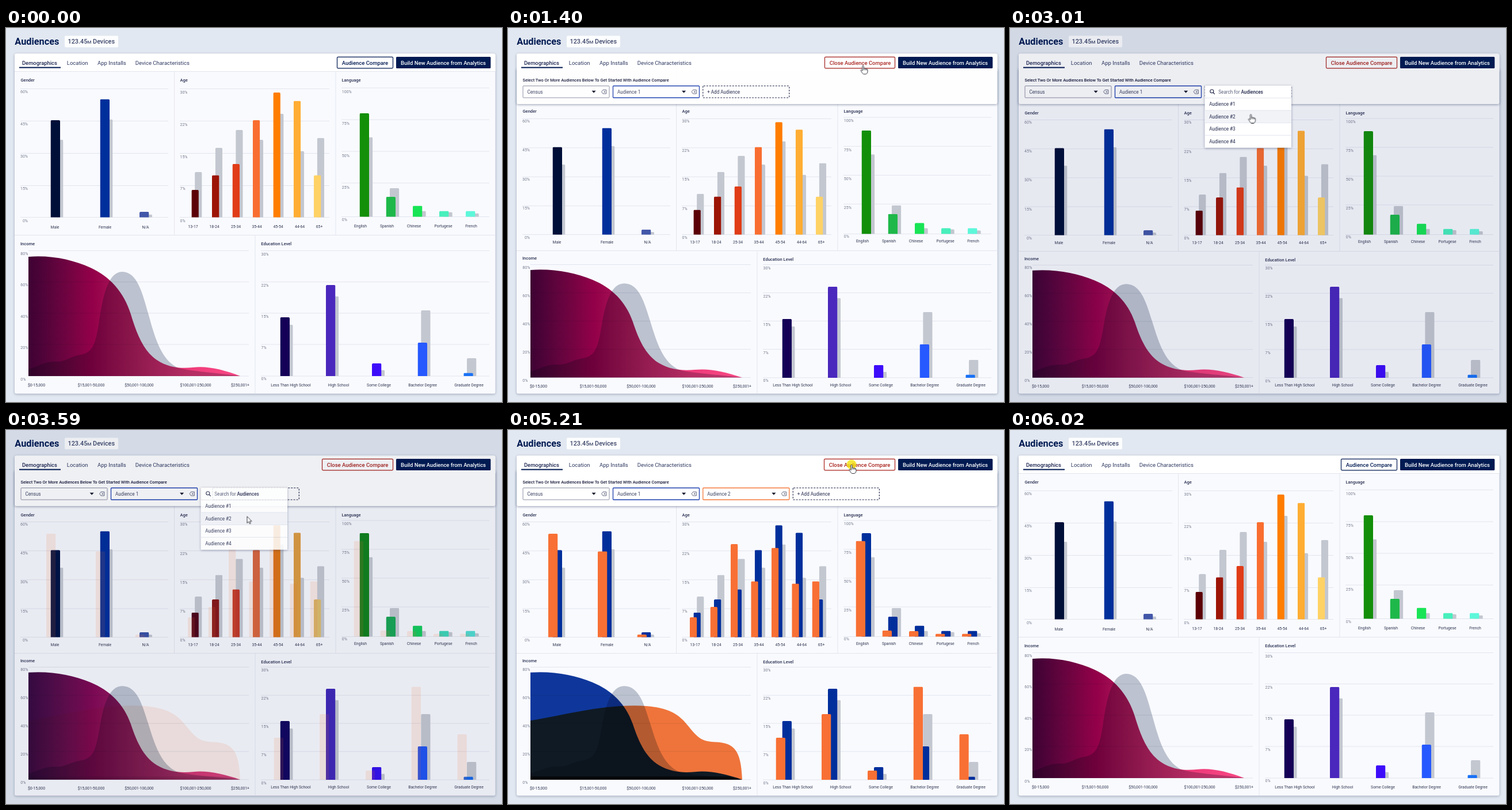
An HTML page for the animation above (6470 ms loop, 862x649 px).

```html
<!DOCTYPE html>
<html lang="en">
<head>
<meta charset="utf-8">
<title>Audiences</title>
<style>
  /* --p: compare panel open, --c: second audience chosen, --d: dropdown opened */
  @property --p { syntax: "<number>"; inherits: true; initial-value: 0; }
  @property --c { syntax: "<number>"; inherits: true; initial-value: 0; }
  @property --d { syntax: "<number>"; inherits: true; initial-value: 0; }
  @property --hand { syntax: "<number>"; inherits: true; initial-value: 0; }

  html, body { margin: 0; width: 100%; height: 100%; overflow: hidden; background: #e2e8f1; }
  svg { display: block; font-family: Roboto, "Open Sans", Arial, sans-serif; }
  #stage {
    --q: calc(var(--c) * var(--p));
    --drop: calc(var(--d) * (1 - var(--c)));
    animation: panel 6470ms infinite, choose 6470ms infinite, drop 6470ms infinite;
    animation-timing-function: cubic-bezier(.65, 0, .35, 1);
  }
  @keyframes panel {
    0%, 16.54% { --p: 0; }
    22.87%, 85.94% { --p: 1; }
    92.12%, 100% { --p: 0; }
  }
  @keyframes choose {
    0%, 53.54% { --c: 0; }
    59.72%, 100% { --c: 1; }
  }
  @keyframes drop {
    0%, 31.38% { --d: 0; }
    36.01%, 100% { --d: 1; }
  }

  .line { stroke: #e2e5ee; fill: none; }
  .bar { clip-path: inset(0 0 2px 0); }
  .second { fill: #f87034; opacity: var(--q); }
  .curve { mix-blend-mode: multiply; }
  .panel { fill: #f9fafe; filter: drop-shadow(0 1px 2px rgba(20, 40, 80, .35)); }
  .sheet { fill: #fff; filter: drop-shadow(0 1.5px 2px rgba(20, 35, 75, .45)); }
  .list { fill: #fff; filter: drop-shadow(0 1px 2px rgba(20, 35, 75, .4)); }
  .open { opacity: var(--p); }
  .closed { opacity: calc(1 - var(--p)); }
  .chosen { opacity: var(--c); }
  .add { transform: translateX(calc(var(--c) * 156.5px)); }
  .dropdown { opacity: var(--drop); }
  .dim { fill: #001446; opacity: calc(var(--drop) * .07); }
  .compare {
    x: calc(575.5px - var(--p) * 26px);
    width: calc(97px + var(--p) * 26px);
    fill: #fff; stroke-width: 1.2;
    stroke: color-mix(in srgb, #a8201a calc(var(--p) * 100%), #001a52);
  }
  .label { transform: translateX(calc(var(--p) * -26px)); }

  #cursor {
    animation: move 6470ms infinite cubic-bezier(.45, .05, .4, 1), pose 6470ms infinite step-end;
  }
  #arrow { opacity: calc(1 - var(--hand)); }
  #hand { opacity: var(--hand); }
  #click { opacity: 0; animation: click 6470ms infinite step-end; }
  @keyframes move {
    0%, 1.2% { transform: translate(624px, -24px); }
    1.21% { transform: translate(624px, 5px); }
    7.11%, 26.28% { transform: translate(617px, 64.5px); }
    31.22%, 35.4% { transform: translate(426px, 110px); }
    42.97%, 58.73% { transform: translate(418.5px, 149.5px); }
    66.46%, 81.92% { transform: translate(597px, 60px); }
    86.55%, 100% { transform: translate(620px, -24px); }
  }
  @keyframes pose {
    0% { --hand: 0; } 10.05% { --hand: 1; }
    26.28% { --hand: 0; } 31.22% { --hand: 1; }
    35.86% { --hand: 0; } 46.52% { --hand: 1; }
    52.4% { --hand: 0; } 69.86% { --hand: 1; }
    82.5%, 100% { --hand: 0; }
  }
  @keyframes click {
    0% { opacity: 0; } 12.21% { opacity: .75; } 13.6% { opacity: 0; }
    31.4% { opacity: .75; } 32.8% { opacity: 0; }
    48.69% { opacity: .75; } 50.08% { opacity: 0; }
    80.53% { opacity: .75; } 81.92%, 100% { opacity: 0; }
  }
</style>
</head>
<body>
<svg id="stage" width="862" height="649" viewBox="0 0 862 649"></svg>
<script>
const NAVY = '#001a52', BLUE = '#002f9c';

// Value that goes from a (panel closed) to b (panel open).
const move = (a, b) => `calc(${a.toFixed(2)}px + var(--p) * ${(b - a).toFixed(2)}px)`;
const tint = (from, to) => `color-mix(in srgb, ${to} calc(var(--q) * 100%), ${from})`;

const text = (str, x, y, size, fill, { weight = 400, anchor = 'start', to = y, cls = '' } = {}) =>
  `<text class="${cls}" x="${x}" y="${y + size * .35}" font-size="${size}" font-weight="${weight}"
    text-anchor="${anchor}" fill="${fill}"${to === y ? '' : ` style="transform:translateY(${move(0, to - y)})"`}>${str}</text>`;

const hline = (x1, x2, a, b) =>
  `<path class="line" d="M${x1} 0H${x2}" style="transform:translateY(${move(a, b)})"/>`;

// Bars: label, label x, x, top, grey top, colour, second audience top (open layout), stray offset
const charts = [
  {
    title: 'Gender', x: 25.5, titleY: [90.5, 147], grid: [25, 282], rows: [105.5, 56, 159.5, 50.2],
    ticks: ['60%', '45%', '30%', '15%', '0%'], tickX: 38, anchor: 'end', tickY: [111, 55.8, 163.5, 50.2],
    base: [328.5, 359.6], scale: .898, width: 16.5, grey: 5.5, second: -7.5, labelY: [345.5, 373],
    bars: [
      ['Male', 85, 77.5, 160, 194, '#000f38', 180, [6.7, -20]],
      ['Female', 172, 163.5, 123.5, 158.5, BLUE, 210.5, [6.7, -51.7]],
      ['N/A', 242.5, 232, 319, 323.5, '#4357a9', 355]
    ]
  },
  {
    title: 'Age', x: 302.5, titleY: [90.5, 147], grid: [302, 562], rows: [105.5, 56, 159.5, 50.2],
    ticks: ['30%', '22%', '15%', '7%', '0%'], tickX: 302.5, tickY: [111.5, 55.8, 164, 50.2],
    base: [328.5, 359.6], scale: .898, width: 12.5, grey: 5.7, second: -6.5, labelY: [345, 372.5],
    bars: [
      ['13-17', 325, 322.4, 281, 250, '#5c0007', 325],
      ['18-24', 362, 358, 255.5, 208, '#9c1405', 307],
      ['25-34', 399.5, 393.5, 236, 177, '#e03c17', 198],
      ['35-44', 436, 428.8, 160, 194, '#f96e30', 262.5],
      ['45-54', 473, 464.4, 112, 149, '#ff7d00', 204.5],
      ['44-64', 510.5, 499.8, 126.5, 213.5, '#ffad33', 266.5],
      ['65+', 544.5, 535, 255.5, 191, '#ffd265', 262.5]
    ]
  },
  {
    title: 'Language', x: 583.5, titleY: [90.5, 147], grid: [583, 840], rows: [104, 55, 157, 50],
    ticks: ['100%', '75%', '50%', '25%', '0%'], tickX: 583.8, tickY: [110.5, 55.5, 163, 50],
    base: [327.5, 358.5], scale: 1, width: 16.5, grey: 6.3, second: -10, labelY: [343.5, 371],
    bars: [
      ['English', 616, 614.5, 148, 189.5, '#138f0a', 192.5],
      ['Spanish', 662, 660.5, 293, 278, '#1eb84a', 348],
      ['Chinese', 709, 707, 308.5, 317.5, '#18e455', 349],
      ['Portugese', 760, 753, 317.5, 319.5, '#48efbc', 353.5],
      ['French', 808.5, 799, 317.5, 321.5, '#5ef7da', 353.5]
    ]
  },
  {
    title: 'Income', x: 25, titleY: [374.5, 400.5], grid: [39, 422], rows: [386.5, 54.2, 411.5, 48.8],
    ticks: ['80%', '60%', '40%', '20%', '0%'], tickX: 25.3, tickY: [391.5, 54.5, 416, 49],
    base: [604, 606.7], scale: .898, labelY: [619.5, 621.5],
    bars: [['$0-15,000', 53], ['$15,001-50,000', 148], ['$50,001-100,000', 231.5],
      ['$100,001-250,000', 329.5], ['$250,001+', 407]]
  },
  {
    title: 'Education Level', x: 443.3, titleY: [374, 402], grid: [443, 840], rows: [386.5, 54.2, 411.5, 48.8],
    ticks: ['30%', '22%', '15%', '7%', '0%'], tickX: 443.5, tickY: [392.5, 54, 417, 48.8],
    base: [604, 607], scale: 1, width: 16.5, grey: 5.7, second: -11, labelY: [620, 619.5],
    bars: [
      ['Less Than High School', 495, 476.5, 502, 515, '#150057', 534],
      ['High School', 578, 556, 446, 465.5, '#4a28bd', 493],
      ['Some College', 648, 636, 582, 593.5, '#3d0dfa', 591],
      ['Bachelor Degree', 724, 715.5, 546, 490, '#2659ff', 445.5],
      ['Graduate Degree', 804.5, 795.3, 598.5, 573, '#1a72f5', 528]
    ]
  }
];

const rect = (cls, x, y, w, h, style) =>
  `<rect class="bar ${cls}" width="${w}" rx="2" style="x:${x};y:${y};height:calc(${h} + 2px);${style}"/>`;

function bar(chart, [, , x, top, greyTop, color, secondTop, stray]) {
  const { base: [a, b], scale: s, width: w } = chart;
  const column = (cls, left, h, style) =>
    rect(cls, left + 'px', move(a - h, b - h * s), w, move(h, h * s), style);
  const left = x + chart.second, h = b - secondTop;
  return column('', x + chart.grey, a - greyTop, 'fill:#c3c7d0') +
    column('', x, a - top, `fill:${tint(color, BLUE)}`) +
    (stray
      ? rect('second', move(left + stray[0], left), move(secondTop + stray[1], secondTop), w, h + 'px', '')
      : column('second', left, h / s, ''));
}

function drawChart(c) {
  const [r0, rs, r1, rt] = c.rows, [t0, ts, t1, tt] = c.tickY;
  let out = text(c.title, c.x, c.titleY[0], 7.5, '#2a3152', { weight: 500, to: c.titleY[1] });
  c.ticks.forEach((tick, i) => {
    out += i < 4 ? hline(...c.grid, r0 + i * rs, r1 + i * rt) : hline(...c.grid, ...c.base);
    out += text(tick, c.tickX, t0 + i * ts, 7, '#777d8e', { anchor: c.anchor, to: t1 + i * tt });
  });
  for (const b of c.bars) {
    if (c.width) out += bar(c, b);
    out += text(b[0], b[1], c.labelY[0], 6.8, '#2f3650', { anchor: 'middle', to: c.labelY[1] });
  }
  return out;
}

function incomeCurves() {
  const { base: [a, b], scale: s } = charts[3];
  const fit = `transform:translateY(${move(a, b)}) scaleY(calc(1 + var(--p) * ${s - 1})) translateY(${-a}px)`;
  const curve = (d, style) => `<path class="curve" d="${d}" style="${fit};${style}"/>`;
  const stops = [[0, '#3f0233'], [.3, '#960049'], [.75, '#f43a78'], [1, '#ff4b87']];
  return `<linearGradient id="wine" gradientUnits="userSpaceOnUse" x1="39" y1="0" x2="407" y2="0">` +
    stops.map(([o, col]) => `<stop offset="${o}" style="stop-color:${tint(col, '#0f389c')}"/>`).join('') +
    `</linearGradient>` +
    curve('M39 397C80 394 115 402 147 416C180 431 205 458 217 497C226 527 238 560 262 576C283 590 305 591 325 589C350 586 378 593 407 604H39Z', 'fill:url(#wine)') +
    curve('M39 592C55 588 65 579 85 579C105 580 110 570 130 567C150 563 155 550 161 515C167 475 175 423 202 423C228 423 237 460 247 495C257 530 268 577 300 590C330 597 375 599 407 604H39Z', 'fill:#c1c6d0') +
    curve('M39 490C95 480 155 461 220 461C290 461 303 487 318 507C333 527 340 530 360 531.5C392 533 405 545 407 604H39Z', 'fill:#f5763b;opacity:var(--q)') +
    curve('M39 598H385L407 604H39Z', 'fill:#444;opacity:var(--q)');
}

function field(label, x, stroke, width, cls = '') {
  return `<g class="${cls}"><rect x="${x}" y="100.5" width="150" height="20.5" rx="1" fill="#fff" stroke="${stroke}" stroke-width="${width}"/>
    ${text(label, x + 7.5, 110.8, 8.15, '#3a4060')}
    <path d="M${x + 119.5} 108.8h7.2l-3.6 4z" fill="#14172c"/>
    <path d="M${x + 139} 107.4h5.8v6.6h-5.8l-2.4-3.3zm1.5 2.1l2.6 2.5m0-2.5l-2.6 2.5" fill="none" stroke="#3a4060" stroke-width=".8"/></g>`;
}

function dropdown() {
  const rows = [1, 2, 3, 4].map(i => {
    const y = 99.8 + i * 21.6;
    return (i === 2 ? `<rect x="338.5" y="${y}" width="150.5" height="21.6" fill="#f1f3f7"/>` : '') +
      `<path class="line" d="M338.5 ${y}h150.5"/>` + text('Audience #' + i, 346.3, y + 10.8, 8.15, '#20264a');
  }).join('');
  return `<g class="dropdown"><rect class="list" x="338.5" y="100" width="150.5" height="107.8" rx="1"/>${rows}
    <circle cx="350.8" cy="109.8" r="3" fill="none" stroke="#20264a" stroke-width="1.1"/>
    <path d="M353 112l2.8 2.8" stroke="#20264a" stroke-width="1.2"/>
    ${text('Search for <tspan font-weight="500" fill="#20264a">Audiences</tspan>', 362.3, 110.8, 8.15, '#5a617c')}</g>`;
}

const tabs = [['Location', 105.8], ['App Installs', 159], ['Device Characteristics', 224.8]];

document.getElementById('stage').innerHTML = `
  <rect width="862" height="649" fill="#e2e8f1"/>
  ${text('Audiences', 15.3, 23.5, 16.3, NAVY, { weight: 700 })}
  <rect x="102" y="13.5" width="93" height="20" rx="2" fill="#fcfdfe"/>
  ${text('123.45<tspan font-size="8.1">M</tspan> Devices', 107.6, 23.5, 10.8, '#3a4468', { weight: 500 })}
  <rect class="panel" x="15" y="44.5" width="835.5" height="590" rx="3"/>
  <path class="line" d="M15 75.5H850.5"/>
  ${hline(15, 850.5, 359.5, 387.5)}
  ${[292.5, 573].map(x => `<rect x="${x - .5}" y="76" width="1" fill="#e2e5ee" style="height:${move(283.5, 311.5)}"/>`).join('')}
  <rect x="432.5" width="1" fill="#e2e5ee" style="y:${move(359.5, 387.5)};height:${move(275, 247)}"/>
  ${charts.map(drawChart).join('')}
  ${incomeCurves()}
  <g class="open">
    <rect class="sheet" x="15" y="70" width="835.5" height="62" rx="3"/>
    ${text('Select Two Or More Audiences Below To Get Started With Audience Compare', 25.5, 90.5, 7.4, '#16193a', { weight: 500 })}
    ${field('Census', 26, '#8c8fa3', 1)}
    ${field('Audience 1', 182.5, '#1c3fae', 1.3)}
    ${field('Audience 2', 338.8, '#f47a3a', 1.3, 'chosen')}
    <g class="add">
      <rect x="338.8" y="100.5" width="150" height="20.5" rx="1" fill="#fff" stroke="#23284a" stroke-width="1.1" stroke-dasharray="3 2"/>
      ${text('+ Add Audience', 346.2, 110.8, 8.15, '#20264a')}
    </g>
  </g>
  <path d="M15 75V47.5a3 3 0 0 1 3-3H847.5a3 3 0 0 1 3 3V75Z" fill="#fff"/>
  ${text('Demographics', 28, 60.3, 9.4, '#1b2550', { weight: 500 })}
  ${tabs.map(([s, x]) => text(s, x, 60.3, 9.5, '#2d3860')).join('')}
  <rect x="23" y="67.6" width="72" height="2" fill="${NAVY}"/>
  <rect class="compare" y="50.3" height="19.5" rx="1.5"/>
  <g class="label">
    ${text('Audience Compare', 583.8, 60.3, 9.45, NAVY, { weight: 500, cls: 'closed' })}
    ${text('Close Audience Compare', 583.8, 60.3, 9.45, '#a8201a', { weight: 500, cls: 'open' })}
  </g>
  <rect class="dim" width="862" height="649"/>
  <rect x="678" y="50" width="164.3" height="20" rx="1.5" fill="${NAVY}"/>
  ${text('Build New Audience from Analytics', 760, 60.3, 9.45, '#fff', { weight: 500, anchor: 'middle' })}
  ${dropdown()}
  <g id="cursor">
    <circle id="click" r="8.5" fill="#f2e000"/>
    <path id="arrow" d="M.5 .5V12L3.2 9.5L5 13.3L6.8 12.5L5.1 8.8H8.6Z" fill="#fff" stroke="#23252e" stroke-width=".9" stroke-linejoin="round"/>
    <g id="hand" stroke="#23252e" stroke-width=".9" stroke-linejoin="round" stroke-linecap="round">
      <path d="M-1.2 1.6C-1.2 0 1.2 0 1.2 1.6V6C1.6 5 3.6 5.2 3.7 6.4C4.4 5.6 6 5.9 6.1 7C7 6.5 8 7 8 8V11C8 13.6 6.5 15.5 4 15.5H2C0 15.5-.8 14.5-1.8 12.8L-3.8 9.5C-4.3 8.3-3 7.6-2.1 8.5L-1.2 9.5Z" fill="#fff"/>
      <path d="M1.2 6V8.2M3.7 6.4V8.4M6.1 7V8.6" fill="none"/>
    </g>
  </g>`;
</script>
</body>
</html>
```
